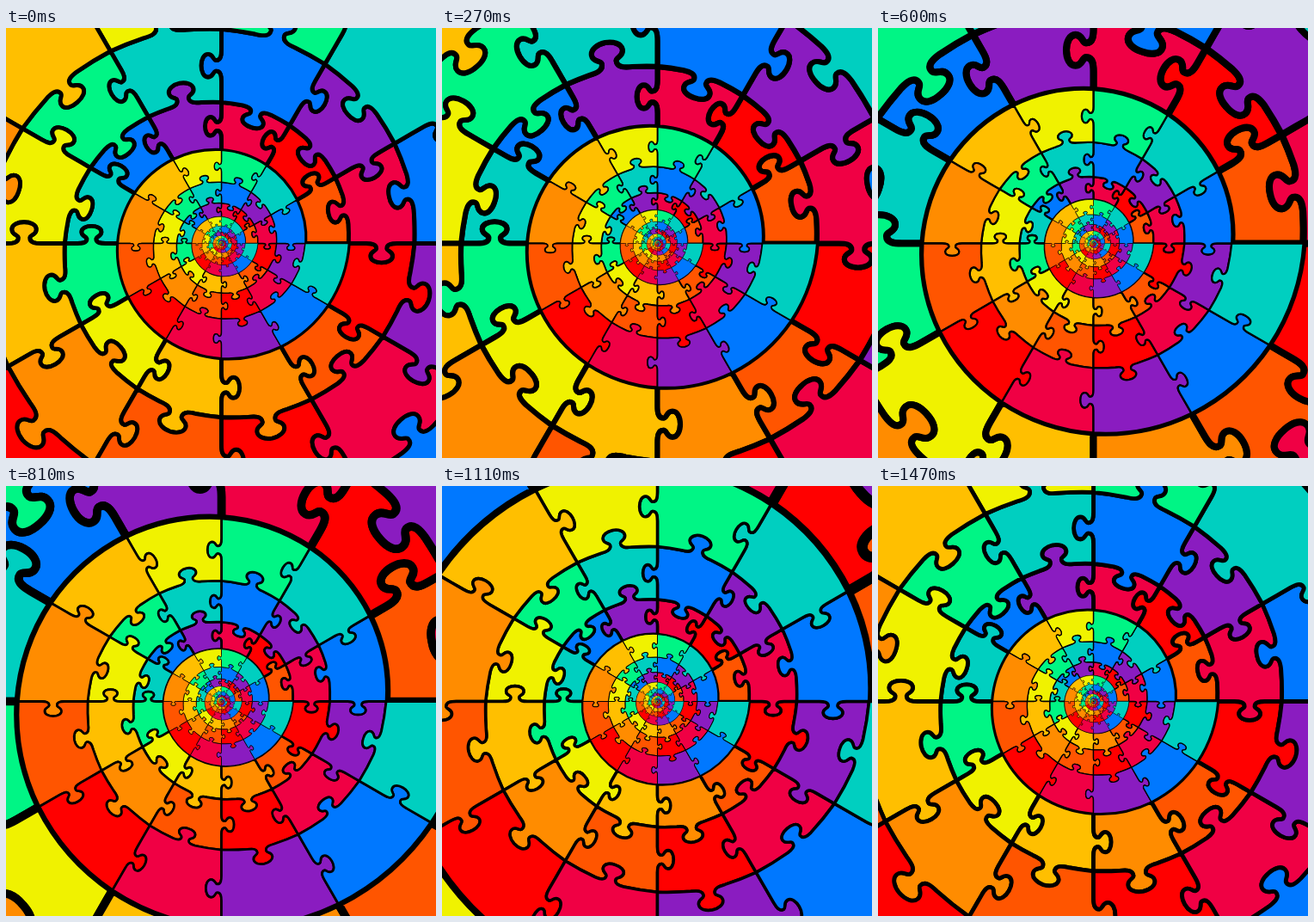
These frames come from a looping animation (500x500 px, 1.5 s). An HTML page:

```html
<!DOCTYPE html>
<html lang="en">
<head>
<meta charset="utf-8">
<title>Spiral puzzle zoom</title>
<style>
html, body { margin: 0; width: 100%; height: 100%; overflow: hidden; background: #000; }
svg { display: block; width: 100vw; height: 100vh; }
</style>
</head>
<body>
<svg viewBox="0 0 500 500">
  <defs><g id="band" stroke="#000" stroke-width="4.9" stroke-linejoin="round"></g></defs>
  <g id="stage" transform="translate(250.5 250.5)"></g>
</svg>
<script>
const NS = 'http://www.w3.org/2000/svg';
const LOOP = 1500, STEP = 30;
const ZOOM = 3.5;        // scale between one band of 36 pieces and the next
const R0 = 97.4;         // radius where a band starts
const SAG = 0.0654;      // bulge of a 30 degree arc, relative to its chord
const COLORS = ['#ff5500', '#ff0000', '#f00044', '#8a1cc0', '#0078ff',
                '#00cfc0', '#00f585', '#f0f200', '#ffbf00', '#ff8c00'];

// Tab direction per edge: + is counterclockwise or outward
const RADIAL = '0++++---+++---++--+++----++--+++-++0'.length === 36
  ? '0++++---+++---++--+++----++--+++-++0' : '';
const RING = '---+--+-++-+--++--++-+--';
const MINUS = new Set([5, 6, 7, 11, 12, 13, 14, 17, 18, 22, 23, 24, 25, 28, 29, 33]);

// Left half of a knob of height 1, centred on 0
const KNOB = [[-.8, 0], [-.55, 0], [-.25, .02], [-.27, .28], [-.29, .42],
              [-.57, .4], [-.57, .66], [-.57, .88], [-.3, 1]];
const FLAT = [[0, 0], [1 / 3, .029], [2 / 3, .029], [1, 0]];

// Bezier points of an edge from 0 to 1 with a knob of the given height
function tab(size) {
  const knob = KNOB.map(([x, y]) => [.5 + x * size, y * size]);
  const foot = knob[0][0];
  const half = [[0, 0], [foot / 3, 0], [foot * 2 / 3, 0], ...knob];
  return [...half, [.5, size], ...half.map(([u, v]) => [1 - u, v]).reverse()];
}

// Point on the spiral after n steps of 30 degrees
function point(n) {
  const r = R0 * ZOOM ** (n / 36), a = n * Math.PI / 6;
  return [r * Math.cos(a), -r * Math.sin(a)];
}

// Knobs grow more slowly than the edges they sit on
function edge(p, q, side, grow, sag) {
  const dx = q[0] - p[0], dy = q[1] - p[1];
  const shape = grow ? tab(grow / Math.sqrt(Math.hypot(dx, dy))) : FLAT;
  return shape.map(([u, v]) => {
    const h = side * v + sag * 4 * u * (1 - u);
    return [p[0] + dx * u - dy * h, p[1] + dy * u + dx * h];
  });
}

function radialEdge(j) {
  const p = point(j), q = point(j + 12);
  if (j % 36 === 0) return edge(p, q, 0, 0, 0);
  return edge(p, q, MINUS.has(j) ? 1 : -1, 2.55, 0);
}

function ringEdge(i) {
  const p = point(i), q = point(i + 1), s = RING[i - 12];
  if (!s) return edge(p, q, 1, 0, SAG);
  return s === '+' ? edge(p, q, 1, 2.75, SAG) : edge(p, q, -1, 2.4, SAG);
}

function piecePath(i) {
  const sides = [ringEdge(i), radialEdge(i + 1), ringEdge(i + 12).reverse(), radialEdge(i).reverse()];
  const fmt = p => p.map(n => n.toFixed(3)).join(' ');
  return 'M' + fmt(sides[0][0]) + sides.map(s => 'C' + s.slice(1).map(fmt).join(' ')).join('') + 'Z';
}

function add(parent, tag, attrs) {
  const el = document.createElementNS(NS, tag);
  for (const k in attrs) el.setAttribute(k, attrs[k]);
  return parent.appendChild(el);
}

const band = document.getElementById('band');
for (let i = 0; i < 36; i++) {
  add(band, 'path', { d: piecePath(i), fill: COLORS[i % COLORS.length] });
}

// Outermost band first, so each smaller one lies on top
const stage = document.getElementById('stage');
const copies = [];
for (let level = 1; level >= -5; level--) {
  copies.push({ level, el: add(stage, 'use', { href: '#band' }) });
}

function draw(ms) {
  const t = Math.floor((ms % LOOP) / STEP) * STEP / LOOP;
  for (const { level, el } of copies) {
    el.setAttribute('transform', `scale(${ZOOM ** (t + level)})`);
  }
}

const start = performance.now();
function tick() {
  draw(performance.now() - start);
  requestAnimationFrame(tick);
}
draw(0);
requestAnimationFrame(tick);
</script>
</body>
</html>
```
